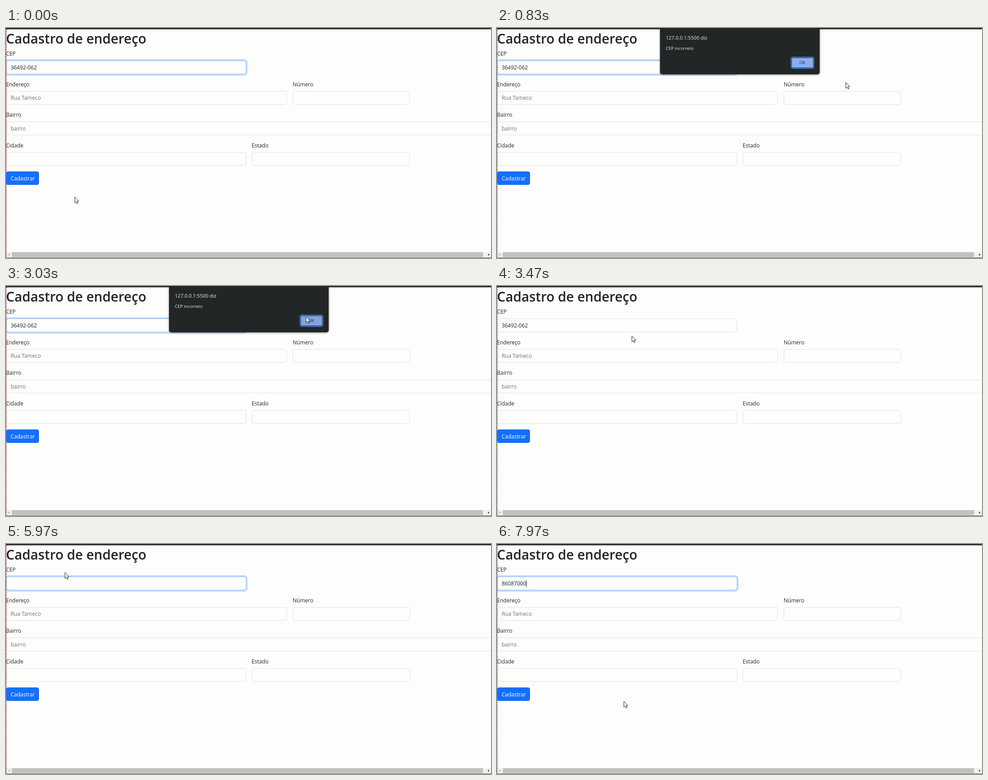
An HTML page that plays this animation: 1086x516 px, repeating every 8000 ms.

```html
<!DOCTYPE html>
<html lang="pt-BR">
<head>
<meta charset="utf-8">
<title>Cadastro de endereço</title>
<style>
  html, body { margin: 0; width: 100%; height: 100%; overflow: hidden; background: #fdfdfc; }
  svg { display: block; position: absolute; left: 0; top: 0; }
  text { font: 12px "Open Sans", "Noto Sans", sans-serif; fill: #212529; }
  .title { font-size: 29.8px; font-weight: 600; }
  .hint { fill: #6c7174; }
  .field { fill: #fdfdfc; stroke: #dee0e3; stroke-width: 1; }
  .focus { stroke: #8ab9fb; }
  .light { fill: #eceef0; }
</style>
</head>
<body>
<svg id="stage" width="1086" height="516" viewBox="0 0 1086 516">
  <defs>
    <filter id="shadow" x="-10%" y="-20%" width="120%" height="150%">
      <feDropShadow dx="0" dy="1" stdDeviation="2" flood-opacity=".45"/>
    </filter>
  </defs>
  <g id="page"></g>

  <g id="scrollbar">
    <rect y="502" width="1086" height="13" fill="#f1f1ef"/>
    <rect x="13" y="503" width="1055" height="11" fill="#c1c2be"/>
    <path d="M8 506v5l-3-2.5z" fill="#a3a3a3"/>
    <path d="M1079.5 506v5l3-2.5z" fill="#222"/>
    <rect y="515" width="1086" height="1" fill="#4a4846"/>
  </g>
  <rect width="1086" height="3" fill="#322e2c"/>
  <path d="M1 3V516" stroke="#a04a58" stroke-width="2" stroke-dasharray="2 2" opacity=".85"/>

  <g id="dialog">
    <path d="M365 0H722.5V99a5 5 0 0 1-5 5H370a5 5 0 0 1-5-5z" fill="#232628" filter="url(#shadow)"/>
    <text class="light" x="378" y="26" style="font-size:11.1px">127.0.0.1:5500 diz</text>
    <text class="light" x="378" y="48.5" style="font-size:9.8px">CEP incorreto</text>
    <rect x="658.4" y="65.4" width="51.2" height="25.2" rx="3.5" fill="#20242c" stroke="#4f82d6" stroke-width="1.6"/>
    <rect id="ok" x="660.2" y="67.2" width="47.6" height="21.6" rx="2" fill="#8aaeee"/>
    <text x="683.5" y="81.4" text-anchor="middle" style="font-size:9.4px">OK</text>
  </g>

  <path id="arrow" d="M0 0V13.2L3 10.4L5.1 15.2L7.1 14.3L5.1 9.7H9.2Z" fill="#fff" stroke="#1c1c1c" stroke-width="1" stroke-linejoin="round"/>
  <path id="beam" d="M-2.5-6H-.8L0-5.4L.8-6H2.5M0-5.4V5.6M-2.5 6.2H-.8L0 5.6L.8 6.2H2.5" fill="none" stroke="#333" stroke-width="1.1"/>
</svg>
<script>
const LOOP = 8000;
const $ = id => document.getElementById(id);
const page = $("page");

function add(tag, attrs, content = "") {
  const el = document.createElementNS("http://www.w3.org/2000/svg", tag);
  for (const key in attrs) el.setAttribute(key, attrs[key]);
  el.textContent = content;
  page.append(el);
  return el;
}
const write = (content, x, y, cls = "") => add("text", { x, y, class: cls }, content);
const box = (x, y, right) =>
  add("rect", { x: x + .5, y: y + .5, width: right - x - 1, height: 29.6, rx: 4.8, class: "field" });

function field(label, x, top, right, hint = "") {
  write(label, x, top - 11);
  const rect = box(x, top, right);
  if (hint) write(hint, x + 10.4, top + 19.8, "hint");
  return rect;
}

write("Cadastro de endereço", 0, 35, "title");
const ring = add("rect", { x: -1.6, y: 71.6, width: 540.8, height: 33.6, rx: 6.4, fill: "none", stroke: "#c3dbfb", "stroke-width": 3.4 });
const cep = field("CEP", 0, 73, 538);
field("Endereço", 0, 141.5, 629, "Rua Tameco");
field("Número", 642, 141.5, 904.5);
field("Bairro", 0, 210, 1100, "bairro");
field("Cidade", 0, 278.5, 538);
field("Estado", 550, 278.5, 904.5);
add("rect", { x: 0, y: 321.7, width: 74, height: 30.4, rx: 4.8, fill: "#146ffb" });
write("Cadastrar", 10.4, 341.6).style.fill = "#fff";

const mark = add("rect", { x: 10, y: 79, width: 60.5, height: 19, fill: "#3264cb" });
const value = write("", 10.4, 93);
const caret = add("rect", { y: 81, width: 1, height: 16, fill: "#212529" });

// time, x, y of the pointer
const path = [
  [0, 154, 379], [150, 154, 379], [830, 781, 122], [1900, 781, 122],
  [2700, 672, 69], [3130, 672, 69], [3470, 302, 112], [3750, 271, 91],
  [5200, 271, 91], [5800, 132, 64], [6050, 132, 64], [6700, 282, 336],
  [7500, 282, 336], [7900, 284, 353], [LOOP, 284, 353]
];

function pointerAt(t) {
  const i = Math.max(1, path.findIndex(p => t <= p[0]));
  const [t0, x0, y0] = path[i - 1], [t1, x1, y1] = path[i];
  const u = (t - t0) / (t1 - t0), k = u * u * (3 - 2 * u);
  return [x0 + (x1 - x0) * k, y0 + (y1 - y0) * k];
}

const CLOSE = 3180, CLICK = 3780, SELECT = 3950, ERASE = 5100, TYPE = 6600, KEY = 150;
const show = (el, on) => { el.style.display = on ? "" : "none"; };

function draw(t) {
  const [x, y] = pointerAt(t);
  const inField = x < 538 && y > 73 && y < 104;
  const focused = t < CLOSE || t >= CLICK;
  const selected = t >= SELECT && t < ERASE;

  show($("dialog"), t >= 450 && t < CLOSE);
  $("ok").setAttribute("fill", x > 658 && x < 710 && y > 65 && y < 91 ? "#81a3df" : "#8aaeee");

  show(ring, focused);
  cep.classList.toggle("focus", focused);

  const typed = Math.max(0, Math.floor((t - TYPE) / KEY) + 1);
  value.textContent = t < ERASE ? "36492-062" : "86087000".slice(0, typed);
  value.style.fill = selected ? "#fff" : "";
  show(mark, selected);

  const lastKey = typed ? TYPE + KEY * (Math.min(typed, 8) - 1) : ERASE;
  show(caret, t >= ERASE && (t - lastKey) % 1000 < 500);
  caret.setAttribute("x", 10.2 + (value.textContent ? value.getComputedTextLength() : 0));

  show($("arrow"), !inField);
  show($("beam"), inField);
  for (const id of ["arrow", "beam"])
    $(id).setAttribute("transform", `translate(${x.toFixed(1)} ${y.toFixed(1)})`);
}

const start = performance.now();
function tick(now) {
  draw(Math.max(0, now - start) % LOOP);
  requestAnimationFrame(tick);
}
draw(0);
requestAnimationFrame(tick);
</script>
</body>
</html>
```
